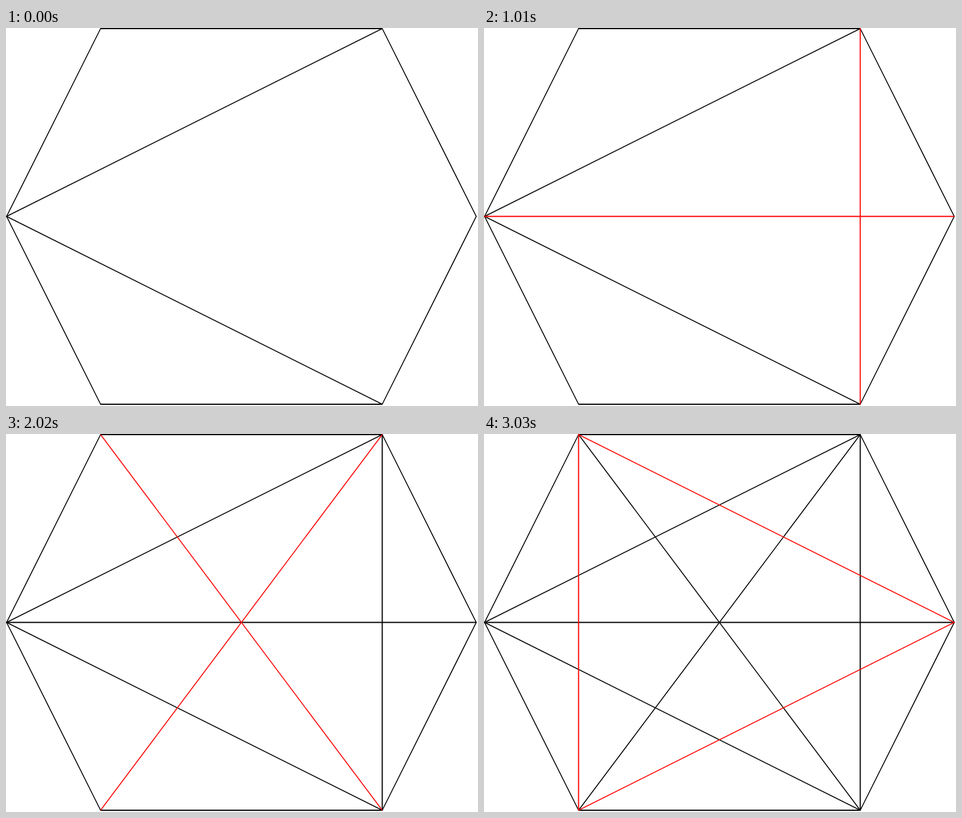
Recreate the animation shown at these times as an HTML page. Size 801 px wide and 643 px high, loop 4.04 s.

```html
<!DOCTYPE html>
<html lang="en">
<head>
<meta charset="utf-8">
<title>Hexagon diagonals</title>
<style>
  html, body { margin: 0; width: 100%; height: 100%; overflow: hidden; background: #fff; }
  svg { display: block; width: 801px; height: 643px; }
  path { fill: none; stroke: #000; stroke-width: 1.6; }
  .flat { stroke-width: 1.9; }
  .step path { stroke: inherit; }
  .step { animation: 4040ms step-end infinite; }
  .one { animation-name: one; }
  .two { animation-name: two; }
  .three { animation-name: three; }
  @keyframes one {
    0% { visibility: hidden; stroke: #f00; }
    25% { visibility: visible; stroke: #f00; }
    50%, 100% { visibility: visible; stroke: #000; }
  }
  @keyframes two {
    0% { visibility: hidden; stroke: #f00; }
    50% { visibility: visible; stroke: #f00; }
    75%, 100% { visibility: visible; stroke: #000; }
  }
  @keyframes three {
    0% { visibility: hidden; stroke: #f00; }
    75%, 100% { visibility: visible; stroke: #f00; }
  }
</style>
</head>
<body>
<svg viewBox="0 0 801 643">
  <path d="M160.5 1L1 320.5L160.5 640M638.5 1L798 320.5L638.5 640"/>
  <path class="flat" d="M160 1H639M160 640H639"/>
  <path d="M638.5 1L1 320.5L638.5 640"/>
  <g class="step one">
    <path class="flat" d="M0.5 320.5H798.5M638.5 0.5V640.5"/>
  </g>
  <g class="step two">
    <path d="M160.5 1L638.5 640M638.5 1L160.5 640"/>
  </g>
  <g class="step three">
    <path d="M160.5 1L798 320.5L160.5 640"/>
    <path class="flat" d="M160.5 0.5V640.5"/>
  </g>
</svg>
</body>
</html>
```
